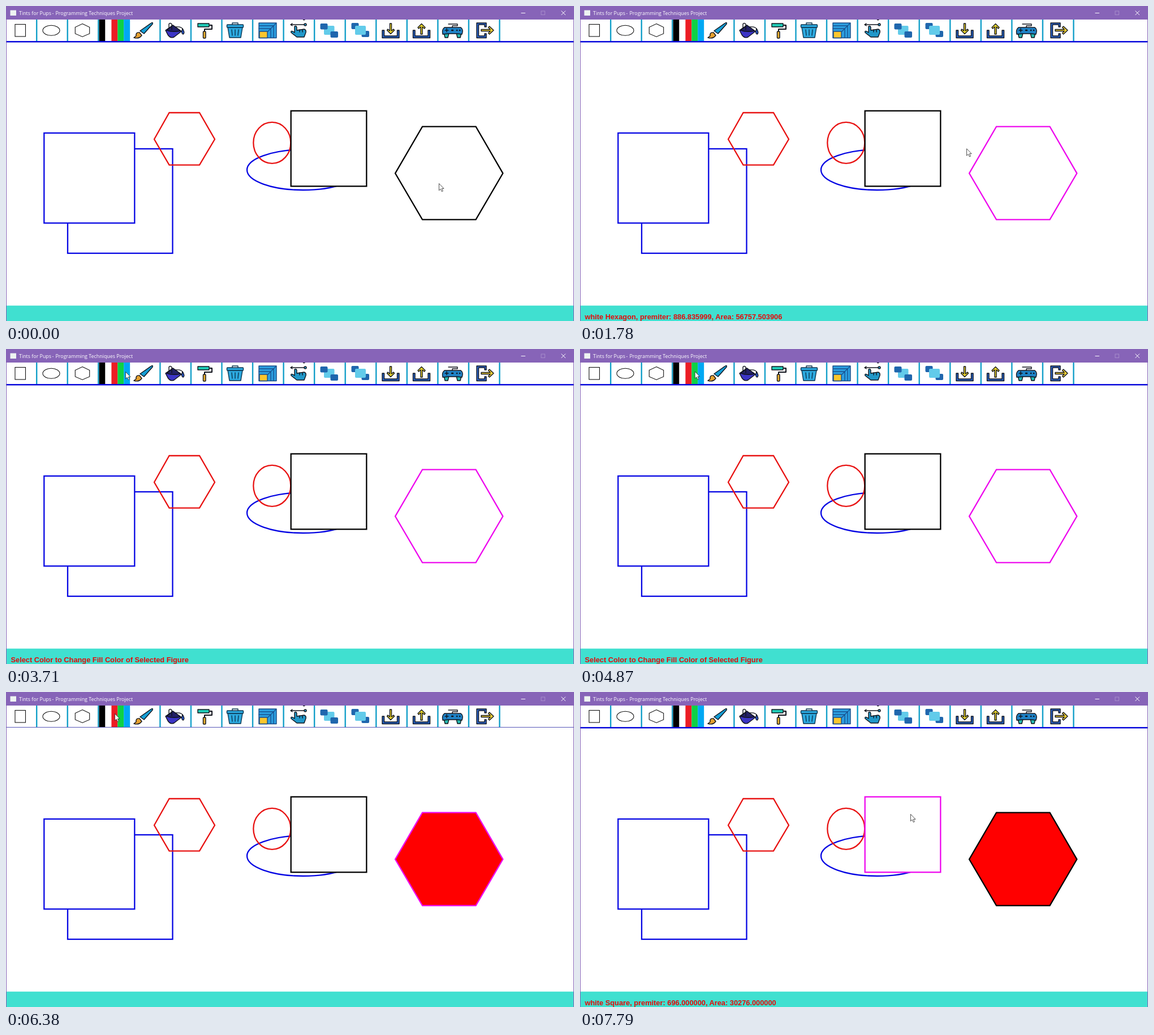
Animation, 1004 px wide and 558 px high, one loop 8000 ms. Source, as an HTML page:

```html
<!DOCTYPE html>
<html lang="en">
<head>
<meta charset="utf-8">
<title>Shape drawing program</title>
<style>
html, body { margin: 0; width: 100%; height: 100%; overflow: hidden; background: #fff; }
svg { display: block; width: 1004px; height: 558px; }
.title { font: 8.9px "Open Sans", "Noto Sans", sans-serif; fill: #fff; }
.status { font: bold 12.8px "Liberation Sans", Arial, sans-serif; fill: #e60a0a; white-space: pre; }
.shape { fill: none; stroke-width: 2.3; }
.icon { stroke: #10131c; stroke-width: 1.4; stroke-linejoin: round; stroke-linecap: round; }
.thin { fill: none; stroke: #111; stroke-width: 1.1; }
.blue { stroke: #0505e3; }
.red { stroke: #e81212; }
</style>
</head>
<body>
<svg viewBox="0 0 1004 558" xmlns="http://www.w3.org/2000/svg">
  <rect width="1004" height="558" fill="#fff"/>

  <!-- drawing area -->
  <rect class="shape blue" x="109" y="253" width="185.5" height="185"/>
  <rect class="shape blue" x="67.3" y="225" width="160" height="159.5" style="fill:#fff"/>
  <path class="shape red" d="M262 236L288.5 189H342L369 236L342 281.7H288.5Z"/>
  <ellipse class="shape blue" cx="525" cy="290.3" rx="99" ry="35.7"/>
  <ellipse class="shape red" cx="470.3" cy="242.3" rx="33" ry="36.5"/>
  <rect id="square" class="shape" x="503.7" y="185.7" width="133.6" height="133.6" style="fill:#fff"/>
  <path id="hexagon" class="shape" d="M688 296.3L736 213.7H830.5L878.3 296.3L830.5 378.3H736Z"/>

  <!-- toolbar -->
  <g id="separators" fill="#139fc9"></g>
  <g id="swatches"></g>
  <rect class="thin" x="16" y="32.5" width="18.5" height="21.5"/>
  <ellipse class="thin" cx="80" cy="43.3" rx="15" ry="9"/>
  <path class="thin" d="M135 31.5L147.7 37.5V49L135 54.5L122.3 49V37.5Z"/>
  <g class="icon">
    <g>
      <path fill="#159ed5" d="M257 30Q260 28 259 32L244 49L237 44Z"/>
      <path fill="#e5a02f" d="M236 47Q229 46 230 53L226 56Q235 59 240 52Z"/>
    </g>
    <g>
      <path fill="#3c35c5" d="M282 43L295 34L310 45L297 55Q291 58 286 51Z"/>
      <path fill="#222066" d="M284 43Q294 47 309 44L295 34Z"/>
      <path fill="none" d="M288 40V32Q290 29 293 32V42M300 37Q311 36 313 42"/>
      <path fill="#2b5dda" d="M312 40Q317 48 313 50Q309 49 312 40Z"/>
    </g>
    <g>
      <rect x="339" y="31" width="20" height="6" fill="#20cbb6"/>
      <path fill="none" stroke-width="2" d="M360 34H364V41H351V46"/>
      <rect x="348.5" y="45" width="4.5" height="12" rx="1" fill="#e5ad30"/>
    </g>
    <g fill="#2ca9df" stroke="#0b3550">
      <path d="M392 38H418L415 56H395Z"/>
      <rect x="390.500" y="33" width="29" height="5" rx="1"/>
      <path fill="none" d="M400 33V30H410V33"/>
      <path fill="none" d="M399 42L400 52M405 42V52M411 42L410 52"/>
    </g>
    <g>
      <rect x="447" y="30" width="31" height="26.500" fill="#2c9fe0" stroke="#174a87"/>
      <path fill="none" stroke="#17518f" d="M448 35H473V56M447 40H468V56M463 45L477 31"/>
      <rect x="448" y="45" width="14" height="11.500" fill="#fbc62d" stroke="#174a87"/>
    </g>
    <g>
      <path fill="none" d="M503 33H529M506 31L503 33L506 35"/>
      <circle cx="529" cy="33" r="2" fill="#2aa5d8"/>
      <path fill="#2198c9" d="M510 36Q513 34 514 38V43L527 41Q531 42 530 47L527 55H514L504 47Q503 43 507 45L510 47Z"/>
      <path fill="none" d="M519 42V46M524 42V46"/>
      <path d="M525.500 24.500H528"/>
    </g>
    <g stroke="none">
      <rect x="562" y="35" width="18.500" height="16" rx="2" fill="#62cbea"/>
      <rect x="555.500" y="31" width="13" height="10.500" rx="2" fill="#1f66ad"/>
      <rect x="573.500" y="45" width="13.500" height="11" rx="2" fill="#1f66ad"/>
      <rect x="610.500" y="30" width="13" height="11" rx="2" fill="#1f66ad"/>
      <rect x="628.500" y="44" width="13.500" height="11" rx="2" fill="#1f66ad"/>
      <rect x="617" y="35" width="19" height="16" rx="2" fill="#62cbea"/>
    </g>
    <g>
      <path id="tray" fill="#2460c2" d="M665 43H668.500V53H691.500V43H695V56.500H665Z"/>
      <use href="#tray" x="54.500"/>
      <path fill="#f1d92d" d="M678.500 31H681.500V44L685 41L686.500 43L680 49.500L673.500 43L675 41L678.500 44Z"/>
      <path fill="#f1d92d" d="M733 50H736V37L739.500 40L741 38L734.500 31.500L728 38L729.500 40L733 37Z"/>
    </g>
    <g>
      <path fill="none" d="M789 38V35H798V32H782"/>
      <path fill="#25b8b0" d="M774 48H783L781 56H776ZM796 48H805L803 56H798Z"/>
      <path fill="#1f83c7" d="M775 38H804Q809 42 806 50L797 49H782L772 50Q770 42 775 38Z"/>
      <path fill="none" d="M776 43H782M779 40V46"/>
      <path fill="none" stroke-width="2.500" d="M797 43H797.200M802 43H802.200M788 43H790"/>
    </g>
    <g>
      <path fill="#2c65ca" d="M832 30H849V37H846V33H835.500V53H846V49H849V56.500H832Z"/>
      <path fill="#f3d235" d="M840 41.500H856L852.500 38L854.500 36L862 43L854.500 50L852.500 48L856 44.500H840Z"/>
    </g>
  </g>
  <rect id="rule" x="0" y="62" width="1004"/>

  <!-- window frame -->
  <rect y="530.700" width="1004" height="28" fill="#40e0d0"/>
  <text id="status" class="status" x="8.500" y="555.300"></text>
  <path d="M.5 24V558M1003.500 24V558" stroke="#8764b8"/>
  <rect width="1004" height="24" fill="#8764b8"/>
  <rect x="7.500" y="7.500" width="10.500" height="9.500" fill="#eef4f2"/>
  <text class="title" y="15.700"><tspan x="23">Tints for Pups</tspan><tspan x="81.500">-</tspan><tspan x="87.500">Programming Techniques Project</tspan></text>
  <g fill="none" stroke="#fff">
    <path d="M910.500 12.500H918M981.500 8.500L989 16M989 8.500L981.500 16"/>
    <rect x="946" y="9" width="6.500" height="6.500" stroke="#a78bcb"/>
  </g>

  <path id="cursor" d="M.4 .5V12.800L3.200 10.200L5.300 14.700L7.300 13.800L5.300 9.400H9Z" fill="#fff" stroke="#222" stroke-width=".8"/>
</svg>
<script>
const LOOP = 8000;
const $ = id => document.getElementById(id);

const rect = (x, y, w, h, fill) =>
  `<rect x="${x}" y="${y}" width="${w}" height="${h}"${fill ? ` fill="${fill}"` : ""}/>`;

$("separators").innerHTML = Array.from({ length: 16 }, (_, i) =>
  rect(53 + i * 54.55, 24, 2.4, 38.5)).join("");

$("swatches").innerHTML = ["#000", "#fff", "#ec1c24", "#0ed145", "#00a8f3"].map((c, i) =>
  rect(164.6 + i * 10.9, 24, 10.9, 38.5, c)).join("");

// Pointer moves: start, end, number of steps, destination.
const moves = [
  [200, 560, 6, 765, 279],
  [1700, 1950, 4, 241, 108],
  [2190, 2670, 7, 295.5, 44],
  [3320, 3710, 5, 211, 40],
  [4050, 4260, 3, 204, 39.5],
  [4870, 5180, 5, 192, 39],
  [5340, 5340, 1, 192, 38],
  [6950, 7110, 5, 584, 216]
];

const messages = [
  [0, ""],
  [1140, "white Hexagon, premiter: 886.835999, Area: 56757.503906"],
  [3000, "Select Color to Change Fill Color of Selected Figure"],
  [6380, ""],
  [7630, "white Square, premiter: 696.000000, Area: 30276.000000"]
];

const redraws = [[1140, 1210], [6380, 6950], [7630, 7705]];

const ease = p => p * p * (3 - 2 * p);
const within = (t, a, b) => t >= a && t < b;

function pointer(t) {
  let x = 765, y = 314;
  for (const [start, end, steps, tx, ty] of moves) {
    if (t < start) break;
    const gap = (end - start) / (steps - 1) || 1;
    const step = Math.min(steps, Math.floor((t - start) / gap + 1e-6) + 1);
    const p = ease(step / steps);
    x += (tx - x) * p;
    y += (ty - y) * p;
  }
  return [x, y];
}

function draw(t) {
  const [x, y] = pointer(t);
  $("cursor").setAttribute("transform", `translate(${x.toFixed(2)} ${y.toFixed(2)})`);
  $("status").textContent = messages.filter(m => t >= m[0]).pop()[1];

  const thin = redraws.some(([a, b]) => within(t, a, b));
  $("rule").setAttribute("height", thin ? 1 : 2.5);
  $("rule").setAttribute("fill", thin ? "#5555b8" : "#0808dc");

  $("hexagon").style.stroke = within(t, 1140, 7630) ? "#ee08ee" : "#000";
  $("hexagon").style.fill = t >= 6380 ? "#f00" : "#fff";
  $("square").style.stroke = t >= 7630 ? "#ee08ee" : "#000";
}

function tick() {
  draw(performance.now() % LOOP);
  requestAnimationFrame(tick);
}
tick();
</script>
</body>
</html>
```
